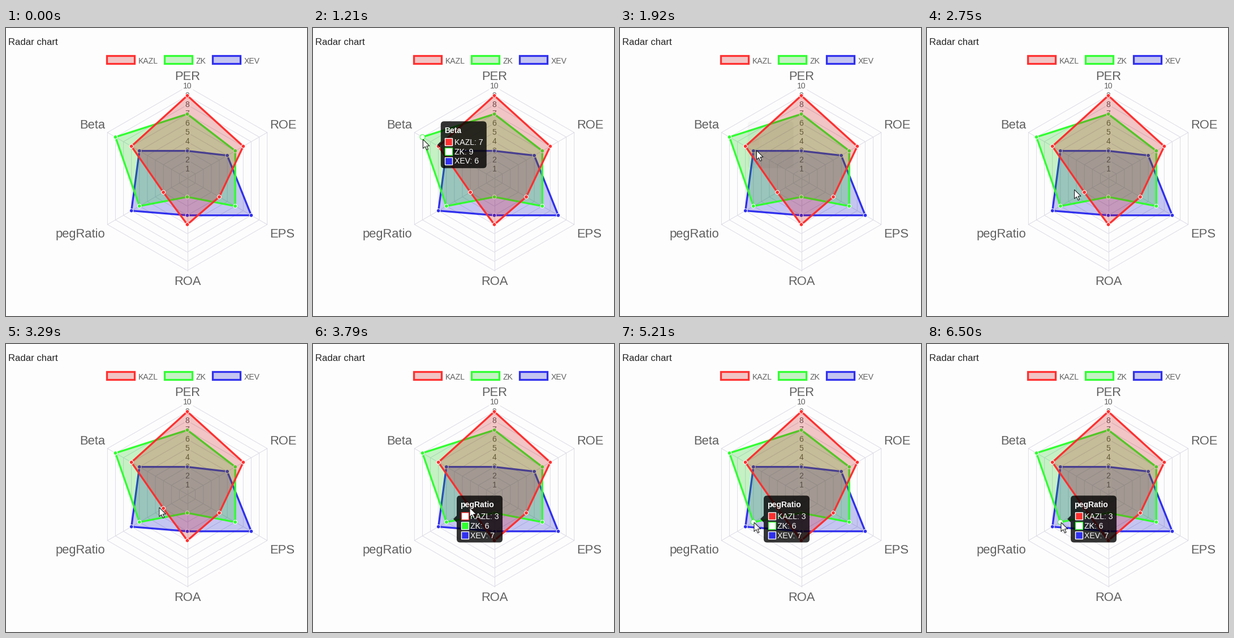
A matplotlib script that plays this animation: 532 by 510 pixels, repeating every 6.54 s.

```python
import numpy as np
import matplotlib.pyplot as plt
from matplotlib.animation import FuncAnimation
from matplotlib.patches import Circle, FancyBboxPatch, Polygon, Rectangle
from matplotlib.transforms import Affine2D

W, H, DPI = 532, 510, 64
LOOP, STEP = 6540, 30
PT = 72 / DPI  # points per pixel
BG, GRID, GREY = "#fdfdfd", "#dcdce6", "#606060"
CX, CY, UNIT = 320.5, 266.5, 16.3

AXES = ["PER", "ROE", "EPS", "ROA", "pegRatio", "Beta"]
# name, line colour, fill colour, values
SERIES = [
    ("KAZL", "#ff3030", "#c80000", [9, 7, 4, 5, 3, 7]),
    ("ZK", "#30ff30", "#00c800", [7, 6, 6, 2, 6, 9]),
    ("XEV", "#3030ee", "#0000c8", [3, 5, 8, 4, 7, 6]),
]
FILL_ALPHA = 0.22
FADE, HIT = 400, 5
# cursor way points: time, x, y
PATH = np.array([
    (500, 70, 165), (880, 194, 196), (1250, 194.5, 197.5), (1690, 241, 216.5),
    (1920, 241.5, 217), (2750, 261, 288), (3400, 273.3, 290), (3600, 277, 290),
    (4000, 277, 290), (4900, 240, 313), (5000, 237, 316), (LOOP, 237, 316),
])

plt.rcParams["font.family"] = "Liberation Sans"
fig = plt.figure(figsize=(W / DPI, H / DPI), dpi=DPI, facecolor=BG)
ax = fig.add_axes([0, 0, 1, 1])
ax.set(xlim=(0, W), ylim=(H, 0))
ax.axis("off")


def spot(axis, value):
    angle = np.pi * axis / 3
    return np.array([CX + value * UNIT * np.sin(angle), CY - value * UNIT * np.cos(angle)])


def ring(values):
    return [spot(i, v) for i, v in enumerate(values)]


def label(x, y, text, size, color=GREY, z=2, **kw):
    return ax.text(x, y, text, fontsize=size * PT, color=color, zorder=z,
                   va="baseline", **kw)


def add(patch):
    return ax.add_patch(patch)


def draw_grid():
    for k in range(1, 11):
        add(Polygon(ring([k] * 6), fill=False, ec=GRID, lw=PT, zorder=1))
    for i in range(6):
        x, y = spot(i, 10)
        ax.plot([CX, x], [CY, y], color=GRID, lw=PT, zorder=1)
    for k in range(1, 11):
        y, half = CY - k * UNIT, 6 if k < 10 else 10
        z = 2 + k / 20
        add(Rectangle((CX - half, y - 9), 2 * half, 18, fc=("white", 0.75),
                      lw=0, zorder=z))
        label(CX, y + 3.9, str(k), 14, z=z + 0.01, ha="center")
    places = [(CX, 92, "center"), (466, 178, "left"), (466, 371, "left"),
              (CX, 455.2, "center"), (175, 371.5, "right"), (175, 178, "right")]
    for name, (x, y, ha) in zip(AXES, places):
        label(x, y, name, 22, ha=ha)


def draw_series():
    points = []
    for i, (name, color, fill, values) in enumerate(SERIES):
        z = 10 - 2 * i
        style = dict(fc=(fill, FILL_ALPHA), ec=color, lw=3.3 * PT, joinstyle="miter")
        add(Polygon(ring(values), zorder=z, **style))
        points.append([add(Circle(p, 3.4, fc=color, ec="white", lw=PT, zorder=z + 1))
                       for p in ring(values)])
        x = (178, 280, 365)[i]
        add(Rectangle((x, 49), 49, 14, **style))
        label(x + 56, 63.3, name, 14)
    return points


class Tooltip:
    """Built around a caret target at (0, 0), then shifted into place."""
    LEFT, WIDTH, HEIGHT = 8.8, 81, 83

    def __init__(self):
        self.shift = Affine2D()
        move = dict(transform=self.shift + ax.transData)
        left, top = self.LEFT, -self.HEIGHT / 2
        dark = dict(fc="black", lw=0, zorder=20, **move)
        box = add(FancyBboxPatch((left + 6, top + 6), self.WIDTH - 12, self.HEIGHT - 12,
                                 boxstyle="round,pad=6,rounding_size=6", **dark))
        caret = add(Polygon([(left, -6), (left - 6, 0), (left, 6)], **dark))
        self.shade = [box, caret]
        self.title = label(left + 6.3, top + 20.5, "", 14, "white", 22,
                           weight="bold", **move)
        self.rows, self.swatches = [], []
        for i in range(len(SERIES)):
            y = top + 29.3 + 16.7 * i
            self.swatches.append(add(Rectangle((left + 7.5, y + 0.7), 13, 13, zorder=21,
                                               lw=1.4 * PT, **move)))
            self.rows.append(label(left + 24, y + 12.4, "", 14, "white", 22, **move))

    def show(self, axis, hovered, opacity, position):
        self.shift.clear().translate(*position)
        self.title.set_text(AXES[axis])
        for i, (name, color, _, values) in enumerate(SERIES):
            active = (axis, i) == hovered
            self.rows[i].set_text(f"{name}: {values[axis]}")
            self.swatches[i].set_facecolor("white" if active else color)
            self.swatches[i].set_edgecolor(color if active else "white")
        bright = [self.title, *self.rows, *self.swatches]
        for artist in self.shade + bright:
            artist.set_alpha(opacity if artist in bright else 0.8 * opacity)
            artist.set_visible(opacity > 0.004)


def cursor_at(t):
    return np.array([np.interp(t, PATH[:, 0], PATH[:, k]) for k in (1, 2)])


def point_under(t):
    if t < PATH[0, 0]:
        return None
    tip = cursor_at(t)
    hits = [(np.hypot(*(spot(a, s[3][a]) - tip)), a, i)
            for i, s in enumerate(SERIES) for a in range(len(AXES))]
    distance, axis, series = min(hits)
    return (axis, series) if distance < HIT else None


def tooltip_timeline():
    """Tooltip state per frame: fades and slides ease out from the last state."""
    states = []
    hovered, axis, begin = None, 0, -FADE
    view = start = goal = np.zeros(3)  # opacity, x, y
    for t in range(0, LOOP, STEP):
        under = point_under(t)
        if under != hovered:
            hovered = under
            if under:
                axis = under[0]
                middle = np.mean([spot(axis, s[3][axis]) for s in SERIES], axis=0)
                target = np.array([1, *middle])
            else:
                target = np.array([0, *goal[1:]])
            first = not goal.any()
            start = np.array([0, *target[1:]]) if first else view
            goal, begin = target, t
        left = (1 - min((t - begin) / FADE, 1)) ** 4
        view = goal + (start - goal) * left
        states.append((axis, hovered, view[0], view[1:]))
    return states


label(4, 30, "Radar chart", 16.6, "#222222")
draw_grid()
points = draw_series()
tooltip = Tooltip()
timeline = tooltip_timeline()
ARROW = np.array([(0, 0), (0, 16), (3.8, 12.6), (6.5, 18.6), (9, 17.5),
                  (6.4, 11.6), (11.5, 11.5)])
cursor = add(Polygon(ARROW, fc="white", ec="#111111", lw=PT, zorder=30))


def update(n):
    t = n * STEP
    axis, hovered, opacity, position = timeline[n]
    for s, row in enumerate(points):
        color = SERIES[s][1]
        for a, point in enumerate(row):
            active = (a, s) == hovered
            point.set_radius(4.4 if active else 3.4)
            point.set_facecolor("white" if active else color)
            point.set_edgecolor(color if active else "white")
    tooltip.show(axis, hovered, opacity, position)
    cursor.set_visible(t >= PATH[0, 0])
    cursor.set_xy(ARROW + cursor_at(t))
    return []


anim = FuncAnimation(fig, update, frames=LOOP // STEP, interval=STEP,
                     repeat=True, repeat_delay=0, blit=False)
plt.show()
```
